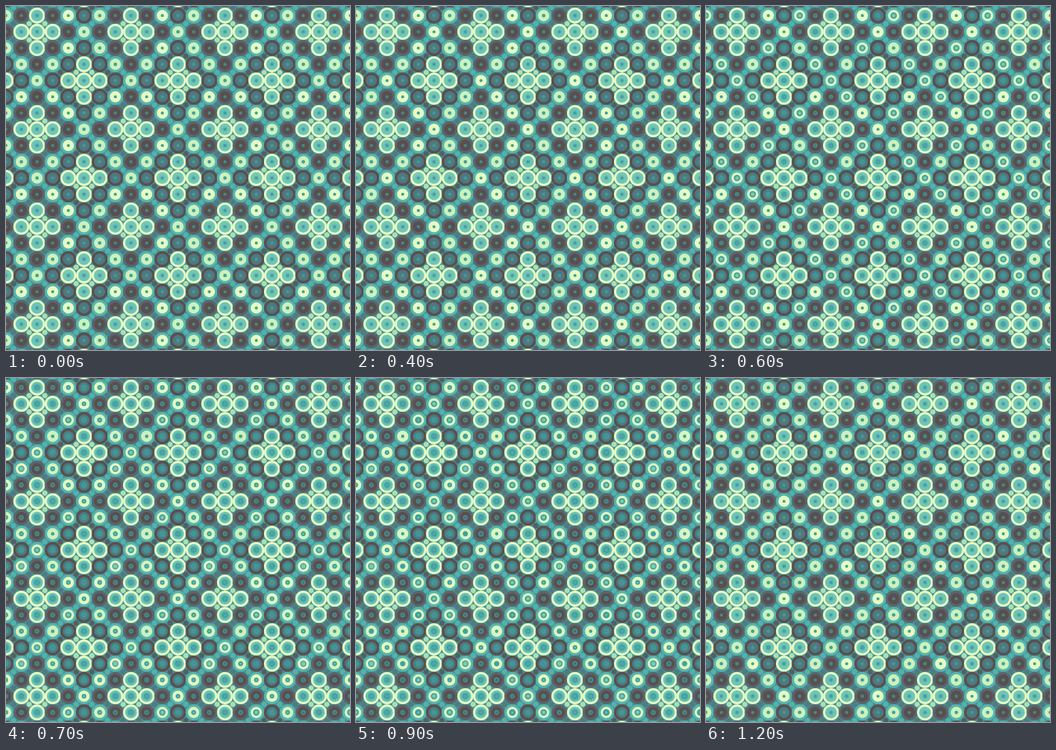
These frames come from a looping animation (600x600 px, 1.3 s). An HTML page with a canvas:

```html
<!DOCTYPE html>
<html>
<head>
<meta charset="utf-8">
<style>
html, body { margin: 0; width: 100%; height: 100%; overflow: hidden; background: #4a8f91; }
canvas { display: block; }
</style>
</head>
<body>
<canvas id="stage" width="600" height="600"></canvas>
<script>
const ctx = document.getElementById('stage').getContext('2d');
const DX = 27.32, DY = 28.333, LOOP = 1300, STEP = 100;
const RIM = 14, FACE = 9.8;
const DARK = '#594f4f', SLATE = '#547980', MINT = '#9de0ad', CREAM = '#e5fcc2';

// Each light disc moves between these poses: [paleness, hole radius, core radius].
const POSES = { a: [0, 2.6, 0], b: [0.35, 3, 0], c: [0.15, 5.6, 3], d: [0, 8.5, 7.6], e: [0, 6.2, 0] };
const LIGHTS = {
  '3,0': 'bbaccab', '0,3': 'bbaacca', '2,1': 'aabadbb', '4,1': 'abacbea', '2,5': 'babcbea',
  '4,5': 'babbbab', '5,2': 'aaaaccb', '1,2': 'bbbcacb', '5,4': 'aaacceb', '1,4': 'bbbbccb'
};

const mod = n => ((n % 6) + 6) % 6;
const wrap = n => Math.min(mod(n), 6 - mod(n));
const reach = (i, j) => wrap(i) + wrap(j);

function seed(i, j) {
  const s = Math.sin(i * 12.9 + j * 78.2 + 1) * 43758.5;
  return s - Math.floor(s);
}

function disc(x, y, r, color, alpha = 1) {
  if (r <= 0 || alpha <= 0) return;
  ctx.globalAlpha = alpha;
  ctx.fillStyle = color;
  ctx.beginPath();
  ctx.arc(x, y, r, 0, 2 * Math.PI);
  ctx.fill();
  ctx.globalAlpha = 1;
}

function pulse(t, s) {
  const u = (t - 380 - 140 * s) / 760;
  return u > 0 && u < 1 ? Math.sin(Math.PI * u) * (0.7 + 0.3 * s) : 0;
}

function light(x, y, keys, t) {
  const k = Math.floor(t / 200), start = k * 200;
  const f = (t - start) / Math.min(200, LOOP - start);
  const from = POSES[keys[k]], to = POSES[keys[(k + 1) % 7]];
  const [pale, hole, core] = from.map((v, n) => v + (to[n] - v) * f);
  disc(x, y, RIM, '#58b5af');
  disc(x, y, FACE, CREAM);
  disc(x, y, FACE, MINT, pale);
  disc(x, y, hole, '#479f9d');
  disc(x, y, core, '#7fc7ae');
  disc(x, y, (core - 4) * 0.5, '#479f9d');
}

function bright(x, y, p, s) {
  disc(x, y, RIM, CREAM);
  disc(x, y, 10.2, '#6dc3b9');
  disc(x, y, 10.2, MINT, 0.25 * s * (1 - p));
  disc(x, y, 5.6 + 2.2 * p, '#57b1aa', 0.25 + 0.7 * p);
  disc(x, y, 2.8 + 3 * p, '#459f9d');
  disc(x, y, 2.6, '#52aca7', p);
}

function darkRing(x, y, p) {
  disc(x, y, RIM, DARK);
  disc(x, y, FACE, '#50757c');
  disc(x, y, 7.6, '#478a8c', 0.25 + 0.6 * p);
  disc(x, y, 2.8 + 3 * p, '#429a98');
  disc(x, y, 2.5, '#468f90', p);
}

function darkDisc(x, y, p) {
  disc(x, y, RIM, '#5a666c');
  disc(x, y, FACE, DARK);
  disc(x, y, 2.7 + 2.4 * p, '#45898a');
  disc(x, y, 2 * p, '#515f62');
}

function gap(i, j) {
  const x = 300 + (i + 0.5) * DX, y = 300 + (j + 0.5) * DY;
  const near = reach(i + 0.5, j + 0.5), far = reach(i - 2.5, j - 2.5);
  if (near === 1 || far === 1) disc(x, y, 4.6, '#a8e0b0');
  else if (near === 2) disc(x, y, 4.6, '#555f62');
  else if (far === 2) disc(x, y, 4.6, SLATE);
  else disc(x, y, 4.8, '#4fb3ad');
}

function cell(i, j, t) {
  const x = 300 + i * DX, y = 300 + j * DY;
  const keys = LIGHTS[mod(i) + ',' + mod(j)];
  if (keys) return light(x, y, keys, t);
  const s = seed(mod(i), mod(j)), p = pulse(t, s);
  const near = reach(i, j), far = reach(i - 3, j - 3);
  if (near < 2 || far < 2) bright(x, y, p, s);
  else if (near === 2) darkRing(x, y, p);
  else darkDisc(x, y, p);
}

function grid(paint) {
  for (let j = -11; j <= 11; j++)
    for (let i = -12; i <= 12; i++) paint(i, j);
}

function frame() {
  const t = Math.floor((performance.now() % LOOP) / STEP) * STEP;
  ctx.fillStyle = '#4a8f91';
  ctx.fillRect(0, 0, 600, 600);
  grid((i, j) => cell(i, j, t));
  grid(gap);
  requestAnimationFrame(frame);
}
frame();
</script>
</body>
</html>
```
